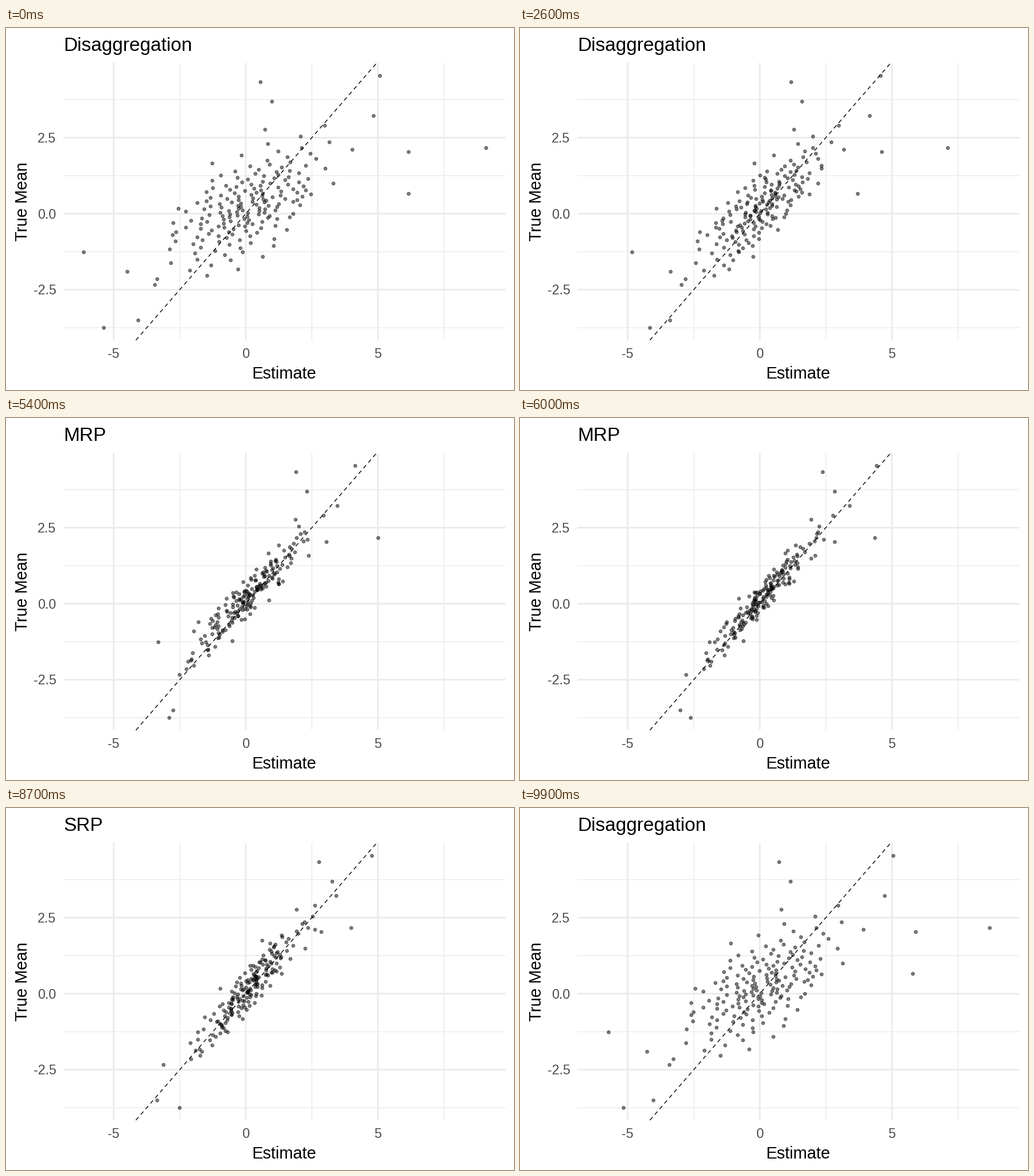
A matplotlib script for the animation above (10 s loop, 885 by 632 pixels).

```python
import matplotlib.pyplot as plt
import numpy as np
from matplotlib.animation import FuncAnimation

W, H, DPI = 885, 632, 64
PX = 72 / DPI                      # points per pixel
LEFT, RIGHT, TOP, BOTTOM = 100, 870, 61, 545
X0, Y0, SX, SY = 417.7, 324.2, 46.03, 53.1
STEPS = 14
STARTS = (19, 53, 86)              # last still frame before each move
TITLES = ("Disaggregation", "MRP", "SRP", "Disaggregation")
INK, GREY, GRID = "black", "#4D4D4D", "#EBEBEB"

# The few extreme points: true mean, then the estimate by each method
EXTREMES = [
    (4.34, 0.55, 1.82, 2.93), (4.54, 5.06, 4.08, 4.74),
    (3.70, 0.98, 2.22, 3.44), (3.22, 4.84, 3.48, 3.30),
    (2.17, 9.08, 5.12, 3.58), (2.03, 6.15, 3.08, 2.60),
    (0.67, 6.15, 1.27, 0.98), (-1.26, -6.14, -3.55, -0.28),
    (-1.90, -4.50, -2.25, -1.45), (-2.33, -3.44, -2.48, -3.10),
    (-3.50, -4.08, -2.71, -3.30), (-3.75, -5.38, -2.95, -2.30),
]


def to_x(v):
    return X0 + SX * v


def to_y(v):
    return Y0 - SY * v


def logistic(u, scale):
    return scale * np.log(u / (1 - u))


def make_cloud(n=180, seed=4):
    """Evenly spread cloud; each method shrinks the error of the last."""
    rng = np.random.default_rng(seed)
    k = np.arange(n)
    rank = (k + rng.uniform(0.1, 0.9, n)) / n
    spread = (k * 0.618034 + rng.uniform(0, 0.12, n)) % 1
    true = 0.25 + logistic(0.015 + 0.975 * rank, 0.61)
    error = logistic(0.03 + 0.94 * spread, 0.78)
    raw = 0.85 * true - 0.1 + error
    mrp = 0.95 * true - 0.1 + 0.25 * error + rng.normal(0, 0.32, n)
    srp = 0.9 * true - 0.05 + 0.08 * error + rng.normal(0, 0.3, n)
    return np.column_stack([true, raw, mrp, srp])


data = np.vstack([make_cloud(), EXTREMES])
ys, xs = to_y(data[:, 0]), to_x(data[:, 1:].T)

plt.rcParams["font.family"] = "Liberation Sans"
fig = plt.figure(figsize=(W / DPI, H / DPI), dpi=DPI, facecolor="white")
ax = fig.add_axes([0, 0, 1, 1])
ax.set_xlim(0, W)
ax.set_ylim(H, 0)
ax.axis("off")


def label(x, y, text, size, color=INK, **kw):
    return ax.text(x, y, text, fontsize=size * PX, color=color,
                   va="baseline", **kw)


def grid(x_values, y_values, width):
    style = dict(color=GRID, lw=width * PX, solid_capstyle="butt", snap=False)
    for v in x_values:
        ax.plot([to_x(v)] * 2, [TOP, BOTTOM], **style)
    for v in y_values:
        ax.plot([LEFT, RIGHT], [to_y(v)] * 2, **style)


grid((-2.5, 2.5, 7.5), (-3.75, -1.25, 1.25, 3.75), 1.42)
grid((-5, 0, 5), (-2.5, 0, 2.5), 2.85)

for v in (-5, 0, 5):
    label(to_x(v), 576.3, str(v), 23.3, GREY, ha="center")
for v in (-2.5, 0.0, 2.5):
    label(87.5, to_y(v) + 8.4, str(v), 23.3, GREY, ha="right")
label(485.2, 612.3, "Estimate", 28.9, ha="center")
label(37, 303.3, "True Mean", 28.8, ha="center", rotation=90,
      rotation_mode="anchor")
title = label(LEFT, 39.8, TITLES[0], 33.4)

dots = ax.scatter(xs[0], ys, s=(5.6 * PX) ** 2, facecolor=(0, 0, 0, 0.5),
                  edgecolor=(0, 0, 0, 0.5), linewidth=1.1 * PX, zorder=3)

ends = np.array([(Y0 - BOTTOM) / SY, (Y0 - TOP) / SY])
ax.plot(to_x(ends), to_y(ends), color=INK, lw=1.4 * PX, zorder=4,
        dashes=(5, 4.2), dash_capstyle="butt")


def update(frame):
    x = xs[0].copy()
    shown = 0
    for k, start in enumerate(STARTS):
        t = min(max((frame - start) / STEPS, 0), 1)
        x += t * (xs[(k + 1) % 3] - xs[k])
        shown += t > 0.5
    dots.set_offsets(np.column_stack([x, ys]))
    title.set_text(TITLES[shown])
    return dots, title


anim = FuncAnimation(fig, update, frames=100, interval=100, repeat=True,
                     repeat_delay=0)
plt.show()
```
